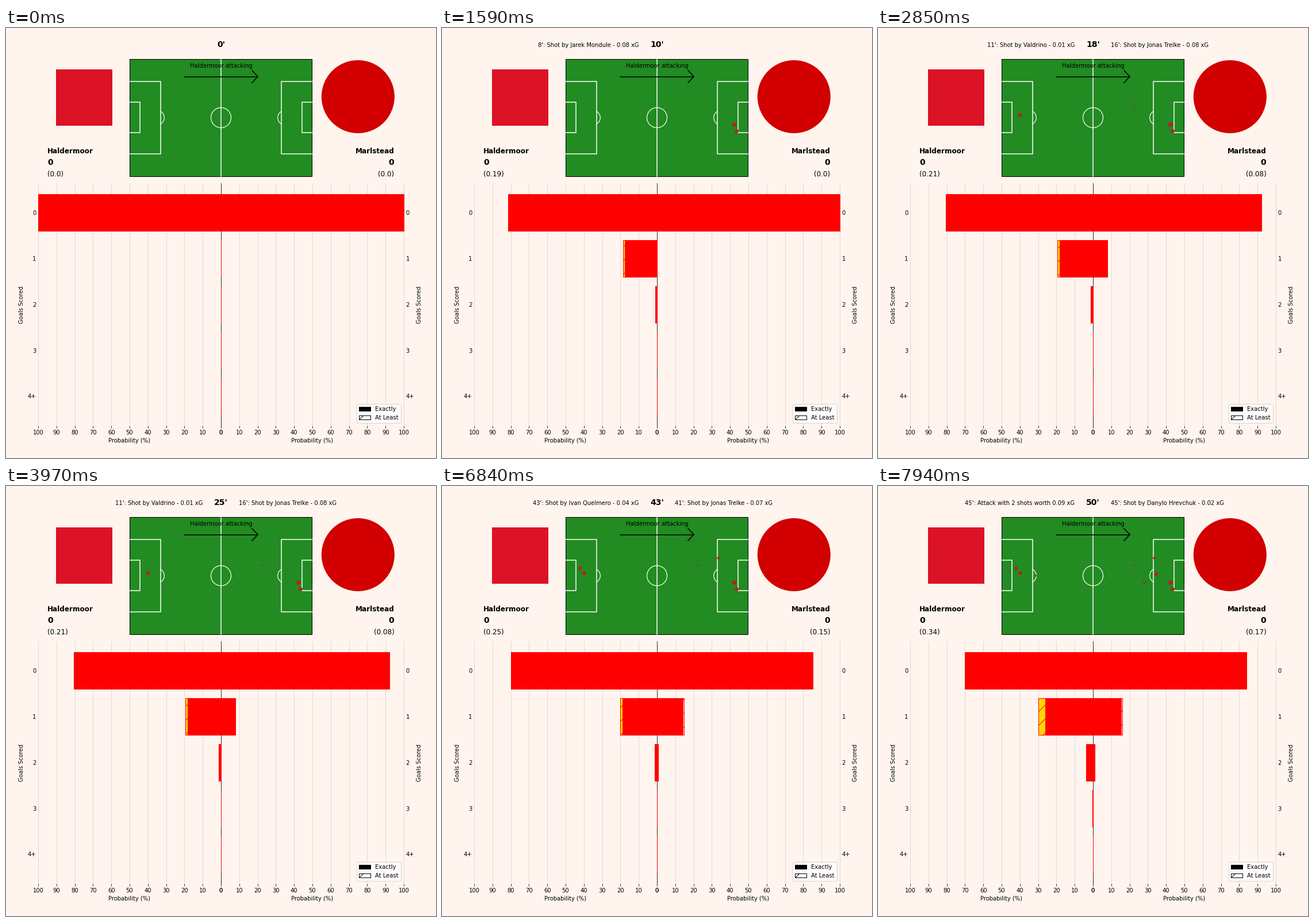
Recreate the animation shown at these times as a matplotlib script. Size 748 by 748 pixels, loop 8 s.

```python
import numpy as np
import matplotlib.pyplot as plt
from matplotlib.animation import FuncAnimation
from matplotlib.patches import Circle, Patch, Rectangle

SIZE, DPI = 748, 72
LOOP, STEP = 8000, 20
LAST_MINUTE = 50
MID, UNIT = 374, 3.18            # zero line and pixels per percent
TOP, BOTTOM = 270, 692
ROW, BAR_TOP, BAR_H = 79.75, 289.4, 63.9
HOME, AWAY = "Haldermoor", "Marlstead"

# minute, text, chances as (x, y, xG)
HOME_SHOTS = [
    (8, "Shot by Jarek Mondule", [(508.7, 168, .112)]),
    (8, "Shot by Jarek Mondule", [(512.6, 179.3, .082)]),
    (11, "Shot by Valdrino", [(445, 138, .013)]),
    (43, "Shot by Ivan Quelmero", [(480.8, 125.4, .04)]),
    (45, "Attack with 2 shots worth", [(483.6, 153.7, .07), (463, 168.5, .023)]),
]
AWAY_SHOTS = [
    (16, "Shot by Jonas Trelke", [(247.3, 151.6, .079)]),
    (41, "Shot by Jonas Trelke", [(240.4, 143.3, .073)]),
    (45, "Shot by Danylo Hrevchuk", [(274.2, 156, .018)]),
]
SHOT_MINUTES = {s[0] for s in HOME_SHOTS + AWAY_SHOTS}

fig = plt.figure(figsize=(SIZE / DPI, SIZE / DPI), dpi=DPI, facecolor="seashell")
ax = fig.add_axes([0, 0, 1, 1])
ax.set(xlim=(0, SIZE), ylim=(SIZE, 0))
ax.axis("off")


def label(x, y, text, size=10, ha="center", va="baseline", **kw):
    return ax.text(x, y, text, fontsize=size, ha=ha, va=va, zorder=6, **kw)


def line(xs, ys, color="white", lw=1.5, z=2):
    ax.plot(xs, ys, color=color, lw=lw, zorder=z)


def total_xg(shot):
    return sum(chance[2] for chance in shot[2])


def goal_odds(xgs):
    """Chance of 0, 1, 2, 3 and 4+ goals from independent shots."""
    p = np.array([1., 0, 0, 0, 0])
    for x in xgs:
        scored = np.append(0, p[:-1] * x)
        scored[-1] += p[-1] * x
        p = p * (1 - x) + scored
    return p


def draw_pitch():
    ax.add_patch(Rectangle((215, 54), 317.5, 204.3, fc="forestgreen", ec="black", lw=1))
    line([MID, MID], [54.5, 258])
    ax.add_patch(Circle((MID, 156), 17.5, fill=False, ec="white", lw=1.2, zorder=2))
    a = np.linspace(-1.07, 1.07, 30)
    for side in (-1, 1):
        goal = MID + side * 158.2
        for depth, y0, y1 in ((53.5, 92.8, 219), (17, 129.2, 182.4)):
            x = goal - side * depth
            line([goal, x, x, goal], [y0, y0, y1, y1])
        line(goal - side * (47 + 12.5 * np.cos(a)), 156 + 12.5 * np.sin(a), lw=1.2)
    line([310, 438], [84.5, 84.5], "black", z=3)
    line([428, 438, 428], [73.8, 84.5, 95.2], "black", z=3)
    label(MID, 65.5, f"{HOME} attacking", va="center")


def draw_chart():
    ticks = MID + UNIT * np.arange(-100, 101, 10)
    ax.vlines(ticks, TOP, BOTTOM, color="#b0b0b0", alpha=.5, lw=.8, zorder=1)
    ax.vlines(ticks, BOTTOM, BOTTOM + 3.5, color="black", lw=.8, zorder=1)
    line([MID, MID], [TOP, BOTTOM], "black", .8, 3)
    for side, name_x, edge, ha in ((-1, 27, 52.5, "right"), (1, 719.5, 695.5, "left")):
        for pct in range(0, 101, 10):
            label(MID + side * pct * UNIT, BOTTOM + 7, str(pct), va="top")
        label(MID + side * 159, 713, "Probability (%)", va="top")
        label(name_x, 481, "Goals Scored", va="center", rotation=90)
        for i, goals in enumerate(("0", "1", "2", "3", "4+")):
            label(edge, BAR_TOP + BAR_H / 2 + i * ROW, goals, ha=ha, va="center_baseline")
    legend = ax.legend(
        handles=[Patch(fc="black", ec="black", label="Exactly"),
                 Patch(fc="white", ec="black", hatch="/", label="At Least")],
        loc="lower right", bbox_to_anchor=(692, BOTTOM),
        bbox_transform=ax.transData, fontsize=10)
    legend.set_zorder(5)


class Team:
    def __init__(self, name, side, shots, fill):
        self.side, self.shots = side, shots
        ha, x = ("left", 72) if side < 0 else ("right", 675.5)
        label(x, 217.8, name, 12, ha, weight="bold")
        label(x, 238.3, "0", 14, ha, weight="bold")
        self.xg = label(x, 258, "", 12, ha)
        if side < 0:
            self.note = label(342.3, 33, "", ha="right")
        else:
            self.note = label(405.5, 33, "", ha="left")
        z = 2 if side < 0 else 4
        self.at_least = [self.bar(i, z, fc=fill, hatch="/") for i in range(1, 5)]
        self.exact = [self.bar(i, z, fc="red") for i in range(5)]
        self.dots = []
        for minute, _, chances in shots:
            for x, y, xg in chances:
                dot = Circle((x, y), .2 + 11 * xg ** .5, fc="#b8211f", lw=0, zorder=3)
                self.dots.append((minute, ax.add_patch(dot)))

    def bar(self, row, z, **kw):
        box = Rectangle((MID, BAR_TOP + row * ROW), 0, BAR_H, ec="red", lw=1, zorder=z, **kw)
        return ax.add_patch(box)

    def odds(self, minute):
        return goal_odds(total_xg(s) for s in self.shots if s[0] <= minute)

    def show(self, minute, frac):
        done = [s for s in self.shots if s[0] <= minute]
        self.xg.set_text(f"({round(float(sum(map(total_xg, done))), 2)})")
        if done:
            when, text, _ = done[-1]
            gap = " " if text.startswith("Attack") else " - "
            self.note.set_text(f"{when}': {text}{gap}{total_xg(done[-1]):.2f} xG")
        else:
            self.note.set_text("")
        for when, dot in self.dots:
            dot.set_visible(when <= minute)

        p = (1 - frac) * self.odds(minute - 1) + frac * self.odds(minute)
        tails = np.cumsum(p[::-1])[::-1]
        for box, value in zip(self.exact + self.at_least, [*p, *tails[1:]]):
            box.set_width(self.side * 100 * UNIT * value)


def timeline():
    """Start time, minute and bar progress of every step."""
    t, steps = 0, []
    for minute in range(LAST_MINUTE + 1):
        if minute in SHOT_MINUTES:
            for k in range(1, 6):
                steps.append((t, minute, k / 5))
                t += 30
        else:
            steps.append((t, minute, 1))
            t += 160
    return steps


draw_pitch()
draw_chart()
ax.add_patch(Rectangle((87, 72), 98, 98, fc="#dc1226", lw=0))
ax.add_patch(Circle((612.3, 119.5), 63.5, fc="#d20000", lw=0))
clock = label(MID, 33, "0'", 14, weight="bold")
teams = [Team(HOME, -1, HOME_SHOTS, "gold"), Team(AWAY, 1, AWAY_SHOTS, "white")]
steps = timeline()
starts = [s[0] for s in steps]


def update(i):
    now = i * STEP + STEP / 2
    _, minute, frac = steps[np.searchsorted(starts, now, side="right") - 1]
    clock.set_text(f"{minute}'")
    for team in teams:
        team.show(minute, frac)
    return []


anim = FuncAnimation(fig, update, frames=LOOP // STEP, interval=STEP, repeat=True)
plt.show()
```
